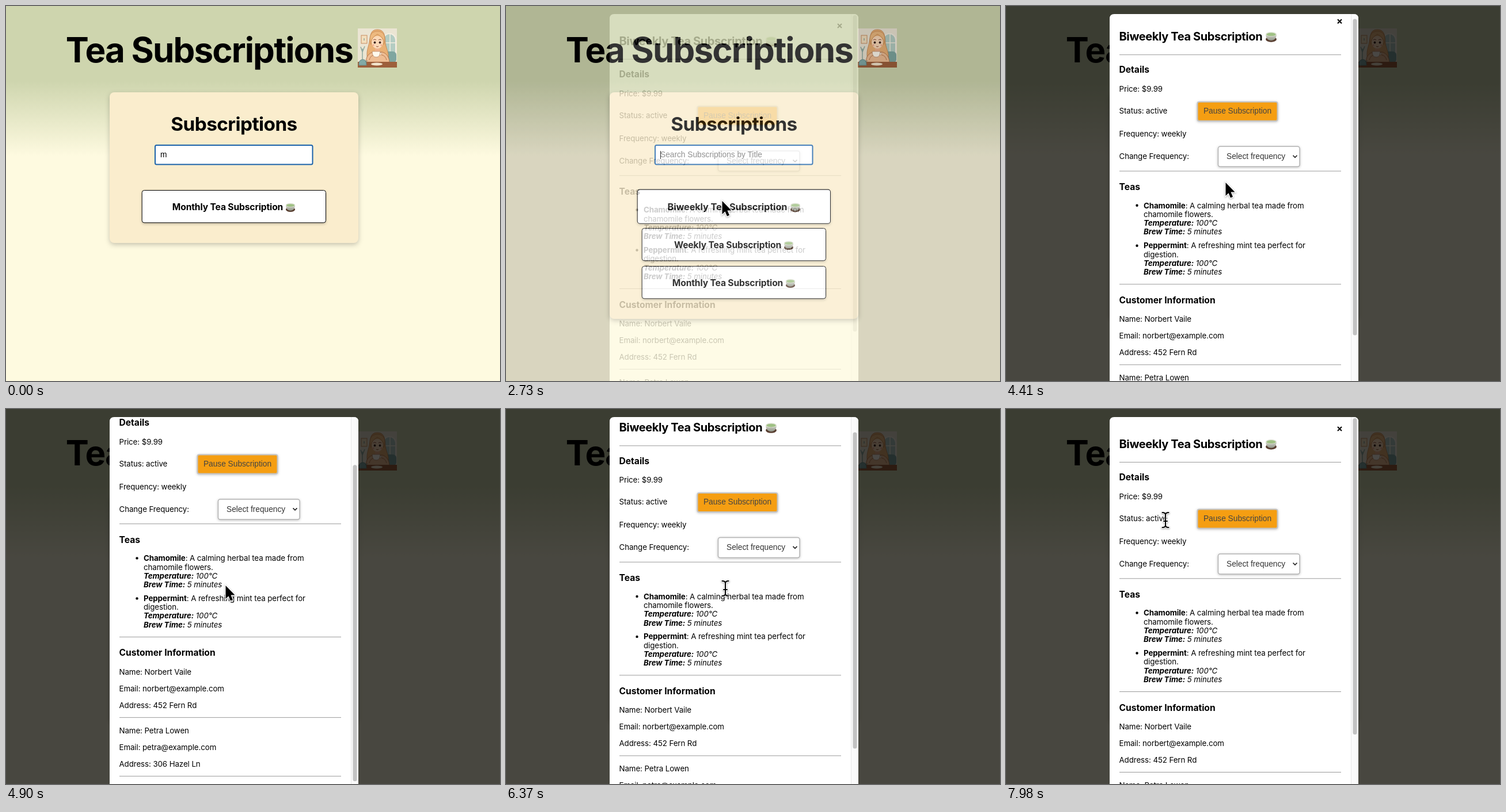
Recreate the animation shown at these times as an HTML page. Size 858x652 px, loop 8 s.

```html
<!DOCTYPE html>
<html lang="en">
<head>
<meta charset="utf-8">
<title>Tea Subscriptions</title>
<style>
  html, body { margin: 0; width: 100%; height: 100%; overflow: hidden; background: #fefae0; }
  svg { display: block; }
  #stage { width: 100vw; height: 100vh; }
  text { font: 13.3px Inter, sans-serif; font-optical-sizing: none; letter-spacing: -.08px; white-space: pre; }
  .title { font-size: 60px; font-weight: 700; letter-spacing: -1.8px; }
  .heading { font-size: 33.3px; font-weight: 700; letter-spacing: -.55px; }
  .name { font-size: 20px; font-weight: 700; letter-spacing: -.38px; }
  .sub { font-size: 15.6px; font-weight: 700; letter-spacing: 0; }
  .item .sub { letter-spacing: -.13px; }
  .control { font: 13.73px "Liberation Sans", Arial, sans-serif; letter-spacing: 0; }
  .mid { text-anchor: middle; }
  .b { font-weight: 700; }
  .i { font-style: italic; }
  .card { fill: #faedcd; filter: drop-shadow(0 3px 4px rgba(0,0,0,.22)); }
  .item rect { fill: #fff; stroke: #000; filter: drop-shadow(0 2px 2px rgba(0,0,0,.2)); }
  .field { fill: #fff; stroke: #1a62a9; stroke-width: 2; }
  .soft { filter: drop-shadow(0 1px 2px rgba(0,0,0,.25)); }
  .pointer { filter: drop-shadow(0 1px 1.5px rgba(0,0,0,.35)); }
</style>
</head>
<body>
<svg id="stage" viewBox="0 0 858 652">
  <defs>
    <linearGradient id="sky" x2="0" y2="1">
      <stop offset=".2" stop-color="#ced5ae"/>
      <stop offset=".4" stop-color="#fefae0"/>
    </linearGradient>
    <linearGradient id="bowl" x2="0" y2="1">
      <stop stop-color="#d9dcd0"/>
      <stop offset="1" stop-color="#8f9387"/>
    </linearGradient>
    <symbol id="cup" viewBox="0 0 20 18">
      <ellipse cx="10" cy="13" rx="9" ry="4.5" fill="#593f31"/>
      <path d="M1 4.5C1 11 5 15 10 15S19 11 19 4.5Z" fill="url(#bowl)"/>
      <ellipse cx="10" cy="4.5" rx="9" ry="3.7" fill="#dfe3d5"/>
      <ellipse cx="10" cy="4.9" rx="7.7" ry="2.7" fill="#9fc184"/>
    </symbol>
    <path id="beamShape" d="M-5.5-13Q0-13 0-9Q0-13 5.5-13M0-9V9M-5.5 13Q0 13 0 9Q0 13 5.5 13M-3 2H3"/>
    <clipPath id="window"><path d="M180 652V22q0-8 8-8H604q8 0 8 8V652Z"/></clipPath>
  </defs>

  <rect width="858" height="652" fill="url(#sky)"/>
  <text class="title mid" x="353" y="97.5">Tea Subscriptions</text>

  <svg x="611" y="39" width="68" height="68" viewBox="0 0 68 68">
    <rect width="68" height="68" fill="#ebe5d3"/>
    <path d="M44 42V20a11 11 0 0 1 22 0V42Z" fill="#b4cdc3" stroke="#f4eee0" stroke-width="2"/>
    <path d="M56 9V42M44 25H66" stroke="#f4eee0" stroke-width="1.5"/>
    <rect x="6" y="12" width="10" height="14" fill="#f3dfbd" stroke="#c78d62"/>
    <path d="M11 17v4M8 35v20M5 32l3 9 4-10" fill="none" stroke="#90aaa0" stroke-width="1.5"/>
    <rect x="46" y="40" width="21" height="20" rx="6" fill="#7fa6a0"/>
    <path d="M34 2C21 2 22 14 20 24S14 40 17 54H52C56 44 49 36 48 25S47 2 34 2Z" fill="#e9b074" stroke="#b97842" stroke-width=".7"/>
    <path d="M14 60C14 49 19 43 27 41H42C50 43 55 50 55 60Z" fill="#eebd93" stroke="#a9683f" stroke-width=".8"/>
    <path d="M30 34h8v7q-4 4-8 0Z" fill="#eeb08a"/>
    <ellipse cx="34" cy="24" rx="10" ry="11" fill="#fbd9b8"/>
    <path d="M23 28C23 17 28 14 34 10C41 14 46 18 45 28C50 14 45 5 34 5S18 14 23 28Z" fill="#edb97f" stroke="#b97842" stroke-width=".6"/>
    <g fill="#3f2720"><circle cx="29.5" cy="24.5" r="1.9"/><circle cx="38.5" cy="24.5" r="1.9"/></g>
    <path d="M27 20q2.500-2 5 0M36 20q2.500-2 5 0M32 31q2 2 4 0" fill="none" stroke="#8b4c33"/>
    <g fill="#f2aa8f"><circle cx="27" cy="29" r="1.6"/><circle cx="41" cy="29" r="1.6"/></g>
    <path d="M20 55q2-8 7-8M50 55q-2-8-9-9" fill="none" stroke="#a9683f" stroke-width=".8"/>
    <rect y="58" width="68" height="10" fill="#9d5f3b"/>
    <path d="M2 64q-1-9 6-10t7 10ZM13 58l4-2" fill="#82aaa6" stroke="#668b87"/>
    <path d="M25 40H39q0 10-7 10t-7-10Zm14 2q5 0 0 5" fill="#fff9ed" stroke="#b98a67" stroke-width=".8"/>
    <ellipse cx="33" cy="62" rx="10" ry="2.5" fill="#f2e4cc"/>
  </svg>

  <rect id="card" class="card" x="180" y="150" width="432" rx="8"/>
  <text class="heading mid" x="396" y="217">Subscriptions</text>
  <rect class="field" x="259" y="242" width="273.5" height="33.5" rx="2.5"/>
  <text id="query" class="control" x="268" y="263"></text>
  <rect id="caret" x="268" y="252" width="1" height="14"/>
  <g id="items"></g>

  <g id="modal">
    <rect width="858" height="652" opacity=".715"/>
    <g clip-path="url(#window)">
      <rect x="180" y="14" width="432" height="640" fill="#fff"/>
      <g id="content">
        <path d="M576 31l7 7m0-7l-7 7" stroke="#000" stroke-width="2"/>
        <use href="#cup" x="450" y="52" width="21" height="19"/>
        <rect id="pause" class="soft" x="332.5" y="174.5" width="139" height="33" rx="3" stroke="#c3c3c3" stroke-width="2"/>
        <text class="control mid" x="402" y="195" fill="#444">Pause Subscription</text>
        <rect class="soft" x="368.5" y="252" width="141.5" height="35" rx="3.5" fill="#fff" stroke="#b5b5b5" stroke-width="1.5"/>
        <text class="control" x="383" y="274" fill="#333">Select frequency</text>
        <path d="M498.5 267.5l3.5 3.5 3.5-3.5" fill="none" stroke="#222" stroke-width="1.7"/>
        <circle cx="227.5" cy="354.5" r="2.2"/>
        <circle cx="227.5" cy="424.5" r="2.2"/>
      </g>
      <rect x="599" y="14" width="13" height="640" fill="#fafafa"/>
      <path d="M599.5 14V652" stroke="#e8e8e8"/>
      <rect id="thumb" x="602.5" y="16" width="7" height="550" rx="3.5" fill="#c2c2c2"/>
    </g>
  </g>

  <g id="cursor">
    <path id="arrow" class="pointer" d="M.5 1V24L5.500 19.200 9 27.500 13 25.800 9.500 17.500H16.500Z" stroke="#fff" stroke-width="2.6" paint-order="stroke"/>
    <g id="beam" class="pointer" fill="none" stroke-linecap="round">
      <use href="#beamShape" stroke="#fff" stroke-width="4"/>
      <use href="#beamShape" stroke="#000" stroke-width="2"/>
    </g>
  </g>
</svg>

<script>
const LOOP = 8000, STEP = 70, SCROLL_MAX = 95.4;
const $ = id => document.getElementById(id);
const add = (parent, markup) => parent.insertAdjacentHTML('beforeend', markup);
const clamp = v => Math.min(1, Math.max(0, v));
const progress = (t, from, to) => clamp((t - from) / (to - from));
const easeInOut = p => p < .5 ? 4 * p ** 3 : 1 - 4 * (1 - p) ** 3;
const smooth = p => p * p * (3 - 2 * p);
const show = (el, on) => el.style.display = on ? '' : 'none';

function addItem(name, y, cupX) {
  add($('items'), `<g class="item"><rect x="236.2" y="${y + .5}" width="319.3" height="56.3" rx="4"/>
    <text class="sub mid" x="385" y="${y + 35}">${name} Tea Subscription</text>
    <use href="#cup" x="${cupX}" y="${y + 22}" width="18" height="16.5"/></g>`);
}
addItem('Biweekly', 320, 488.5);
addItem('Weekly', 386, 482);
addItem('Monthly', 452, 485);
const [biweekly, weekly, monthly] = $('items').children;

const line = (y, text, x = 196.5, cls = '') =>
  add($('content'), `<text class="${cls}" x="${x}" y="${y}">${text}</text>`);
const rule = y => add($('content'), `<path d="M197 ${y}H582" stroke="#9a9a9a"/>`);
const bold = text => `<tspan class="b">${text}</tspan>`;

function addTea(y, name, start, end) {
  [bold(name) + ': ' + start, end].forEach((text, i) => line(y + i * 15.4, text, 239));
  [['Temperature:', '100°C'], ['Brew Time:', '5 minutes']].forEach(([label, value], i) =>
    line(y + (i + 2) * 15.3, `${bold(label)} ${value}`, 239, 'i'));
}

function addCustomer(y, name, email, address) {
  ['Name: ' + name, 'Email: ' + email, 'Address: ' + address].forEach((text, i) => line(y + i * 29, text));
  rule(y + 74.8);
}

line(68, 'Biweekly Tea Subscription', 196.5, 'name');
rule(92.5);
line(124.2, 'Details', 196.5, 'sub');
line(156.7, 'Price: $9.99');
line(195, 'Status: active');
line(235, 'Frequency: weekly');
line(274, 'Change Frequency:');
rule(294.8);
line(328, 'Teas', 196.5, 'sub');
addTea(359.3, 'Chamomile', 'A calming herbal tea made from', 'chamomile flowers.');
addTea(429, 'Peppermint', 'A refreshing mint tea perfect for', 'digestion.');
rule(491.5);
line(524.5, 'Customer Information', 196.5, 'sub');
addCustomer(556.7, 'Norbert Vaile', 'norbert@example.com', '452 Fern Rd');
addCustomer(658.7, 'Petra Lowen', 'petra@example.com', '306 Hazel Ln');

// Pointer stops: time, x, y
const arrowPath = [[1330, 634, 80], [1750, 369, 319], [2100, 375, 338], [3780, 375, 338], [4060, 381, 308], [4270, 381, 306]];
const beamPath = [[6860, 381, 312], [7070, 378, 268], [7350, 362, 192], [7560, 300, 186], [7700, 270, 187], [7840, 246, 190], [7980, 277, 193]];

function along(path, t) {
  const next = path.findIndex(stop => stop[0] > t);
  if (next < 0) return path.at(-1).slice(1);
  if (next === 0) return path[0].slice(1);
  const [t0, x0, y0] = path[next - 1], [t1, x1, y1] = path[next];
  const p = smooth(progress(t, t0, t1));
  return [x0 + (x1 - x0) * p, y0 + (y1 - y0) * p];
}

function render(t) {
  const filtered = t < 70;
  $('query').textContent = filtered ? 'm' : 'Search Subscriptions by Title';
  $('query').setAttribute('fill', filtered ? '#000' : '#757575');
  $('card').setAttribute('height', filtered ? 262 : 394);
  show(biweekly, !filtered);
  show(weekly, !filtered);
  monthly.setAttribute('transform', `translate(0 ${filtered ? -132 : 0})`);
  show($('caret'), t >= 280 && Math.floor((t - 280) / 525) % 2 === 0);

  const grow = 1 + .05 * smooth(progress(t, 1750, 2100));
  biweekly.setAttribute('transform', `translate(396 348.5) scale(${grow}) translate(-396 -348.5)`);

  const opening = progress(t, 2660, 3010);
  show($('modal'), opening > 0);
  $('modal').setAttribute('opacity', opening);
  const scroll = SCROLL_MAX * (easeInOut(progress(t, 4200, 4970)) - easeInOut(progress(t, 5890, 6720)));
  $('content').setAttribute('transform', `translate(0 ${-scroll})`);
  $('thumb').setAttribute('y', 16 + scroll * .855);

  const beam = t >= 5530;
  const [x, y] = along(beam ? beamPath : arrowPath, t);
  const overPause = beam && x > 332 && x < 472 && y > 174 && y < 208;
  $('pause').setAttribute('fill', overPause ? '#e8940f' : '#f59e12');
  const overSelect = beam && x > 368 && x < 510 && y > 252 && y < 287;
  const arrow = !beam || overPause || overSelect;
  show($('cursor'), t >= 1330);
  show($('arrow'), arrow);
  show($('beam'), !arrow);
  $('cursor').setAttribute('transform', `translate(${x} ${y})`);
}

function tick() {
  const time = performance.now() % LOOP;
  render(Math.floor(time / STEP) * STEP);
  requestAnimationFrame(tick);
}
tick();
</script>
</body>
</html>
```
